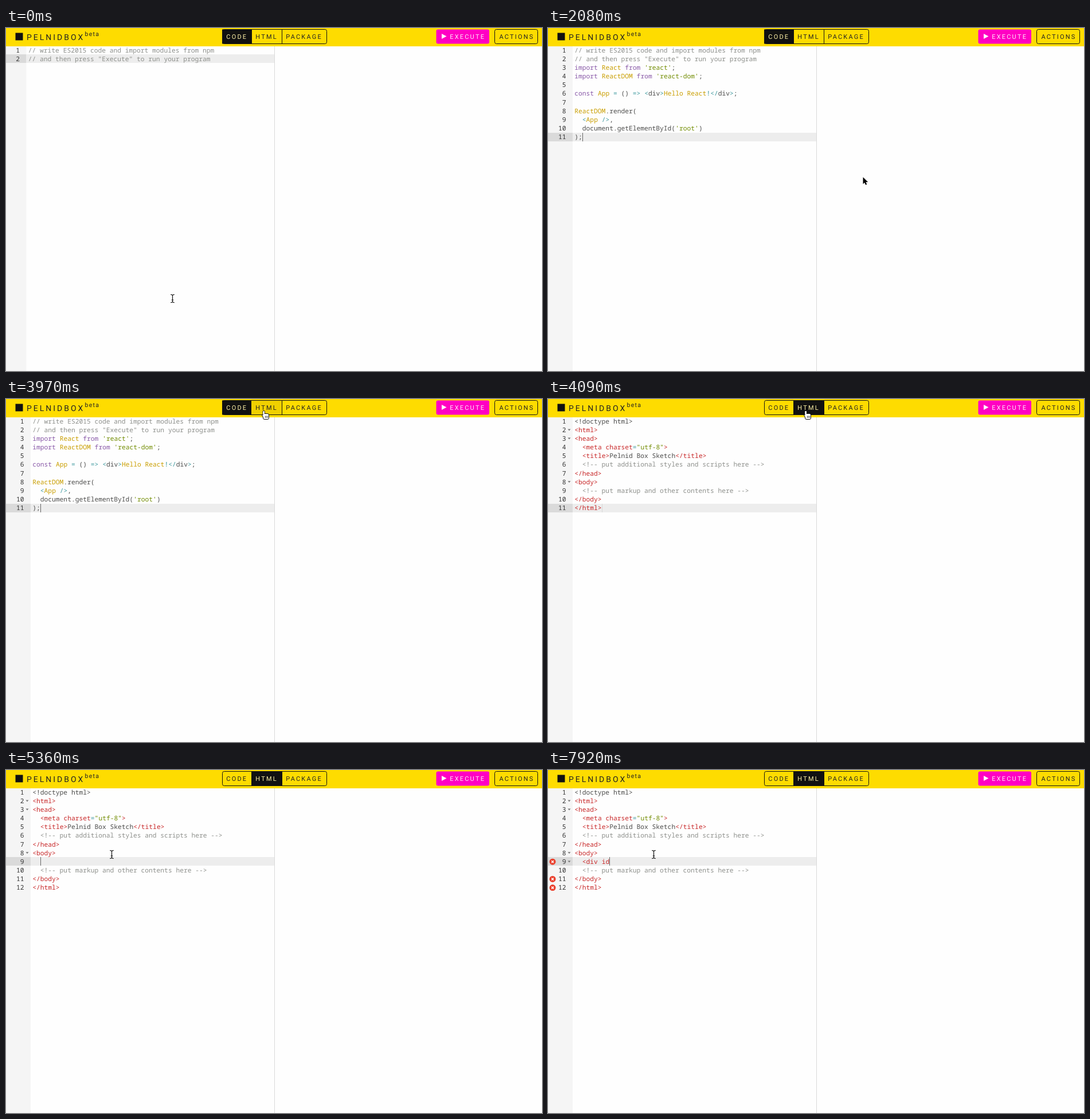
These frames come from a looping animation (935x599 px, 8 s). An HTML page with a canvas:

```html
<!DOCTYPE html>
<html lang="en">
<head>
<meta charset="utf-8">
<title>Code editor</title>
<style>
  html, body { margin: 0; width: 100%; height: 100%; overflow: hidden; background: #fefefe; }
  canvas { display: block; }
</style>
</head>
<body>
<canvas id="stage" width="935" height="599"></canvas>
<script>
const ctx = document.getElementById('stage').getContext('2d');
const LOOP = 8000, CHAR = 6.77, ROW = 15.14, TOP = 31.2;
const MONO = `${CHAR / 0.6}px "Noto Sans Mono", monospace`;
const LABEL = '11px Roboto, sans-serif';
const YELLOW = '#fedc00', INK = '#111';

const COLORS = {
  t: '#4d4d4c', c: '#8e908c', k: '#8959a8', y: '#c99e00',
  s: '#718c00', o: '#3e999f', r: '#c82829'
};

// Each token starts with its color key; tokens are split by "|".
const CODE = [
  'c// write ES2015 code and import modules from npm',
  'c// and then press "Execute" to run your program',
  "kimport |yReact |kfrom |s'react'|t;",
  "kimport |yReactDOM |kfrom |s'react-dom'|t;",
  '',
  'kconst |yApp |o= |t() |o=> <|tdiv|o>|yHello React|o!</|tdiv|o>|t;',
  '',
  'yReactDOM|t.render(',
  't  |o<|yApp |o/>|t,',
  "t  document.getElementById(|s'root'|t)",
  't);'
];
const MARKUP = [
  't<!doctype html>',
  'r<html>',
  'r<head>',
  't  |r<meta charset|o=|s"utf-8"|r>',
  't  |r<title>|tPelnid Box Sketch|r</title>',
  'c  <!-- put additional styles and scripts here -->',
  'r</head>',
  'r<body>',
  'c  <!-- put markup and other contents here -->',
  'r</body>',
  'r</html>'
];

// One key per beat: "·" is a pause, "←" deletes.
const KEYS = '<··di····v· ····i··←·id', BEAT = 90;

function typedAt(t) {
  let out = '';
  for (const key of KEYS.slice(0, Math.max(0, Math.floor((t - 5920) / BEAT) + 1))) {
    if (key === '←') out = out.slice(0, -1);
    else if (key !== '·') out += key;
  }
  return out;
}

// Mouse legs: start, end, and the point reached.
const STEP = 105;
const LEGS = [
  [1555, 2080, 549, 260], [2080, 2290, 737, 69], [2450, 2970, 537, 19],
  [3070, 3580, 455, 21], [3865, 3970, 449, 20], [4245, 4700, 184, 147]
];

function mouseAt(t) {
  let x = 290, y = 472;
  for (const [start, end, x2, y2] of LEGS) {
    const left = Math.max(0, Math.ceil((end - t) / STEP)) * STEP;
    const u = Math.min(1, Math.max(0, 1 - left / (end - start)));
    const p = u * u * (3 - 2 * u);
    x += (x2 - x) * p;
    y += (y2 - y) * p;
  }
  return [x, y];
}

const rowTop = n => Math.round(TOP + ROW * (n - 1));
const rowMid = n => TOP + ROW * (n - 0.5);

function rect(color, x, y, w, h) {
  ctx.fillStyle = color;
  ctx.fillRect(x, y, w, h);
}

function text(str, x, y, color, font, spacing = 0, align = 'left') {
  ctx.font = font;
  ctx.letterSpacing = spacing + 'px';
  ctx.textAlign = align;
  ctx.fillStyle = color;
  ctx.fillText(str, x, y);
  return ctx.measureText(str).width;
}

const label = (str, x, color) => text(str, x, 19, color, LABEL, 2.2);

function paint(fill, stroke, width = 1) {
  if (stroke) {
    ctx.strokeStyle = stroke;
    ctx.lineWidth = width;
    ctx.stroke();
  }
  if (fill) {
    ctx.fillStyle = fill;
    ctx.fill();
  }
}

function roundBox(x, y, w, h, r, fill, stroke, width) {
  ctx.beginPath();
  ctx.roundRect(x, y, w, h, r);
  paint(fill, stroke, width);
}

function shape(points, fill, stroke, width) {
  ctx.beginPath();
  points.forEach(([x, y]) => ctx.lineTo(x, y));
  ctx.closePath();
  paint(fill, stroke, width);
}

function lines(color, width, ...paths) {
  ctx.beginPath();
  for (const [x, y, ...rest] of paths) {
    ctx.moveTo(x, y);
    for (let i = 0; i < rest.length; i += 2) ctx.lineTo(rest[i], rest[i + 1]);
  }
  paint(null, color, width);
}

function editorState(t) {
  const state = { folds: [], errors: [], caret: '#666' };
  if (t < 980) {
    const fresh = t < 350;
    return Object.assign(state, {
      rows: fresh ? CODE.slice(0, 2) : [...CODE.slice(0, 2), ''],
      active: fresh ? 2 : 3, col: fresh ? 47 : 0, caret: t >= 180 && '#666'
    });
  }
  if (t < 4090) {
    const lit = (t - 970) % 1000 < 600;
    return Object.assign(state, { rows: CODE, active: 11, col: 2, caret: lit && '#666' });
  }
  Object.assign(state, { rows: MARKUP, folds: [2, 3, 8] });
  if (t < 5000) return Object.assign(state, { active: 11, col: 7, caret: '#d8d8d8' });
  if (t < 5360) return Object.assign(state, { active: 8, col: 6 });

  const typed = typedAt(t);
  state.rows = [...MARKUP.slice(0, 8), 't  |r' + typed, ...MARKUP.slice(8)];
  if (typed.length > 1) state.folds.push(9);
  if (t >= 6400) state.errors = [t < 7110 ? 10 : 9, 11, 12];
  return Object.assign(state, { active: 9, col: 2 + typed.length });
}

function drawError(n) {
  ctx.save();
  ctx.translate(8, rowMid(n) + 0.3);
  roundBox(-5.5, -5.5, 11, 11, 5.5, '#ea3f2c');
  lines('#fff', 1.5, [-2, -2, 2, 2], [2, -2, -2, 2]);
  ctx.restore();
}

function drawEditor(t) {
  const { rows, active, col, caret, folds, errors } = editorState(t);
  const gutter = t < 980 ? 35.5 : 43, left = gutter + 3.3;
  const y = rowTop(active), h = rowTop(active + 1) - y;

  rect('#f5f5f5', 0, 32, gutter, 567);
  rect('#dadada', 0, y, gutter, h);
  rect('#ededed', gutter, y, 468 - gutter, h);

  rows.forEach((row, i) => {
    const base = TOP + ROW * i + 11.5;
    text(i + 1, gutter - 11.6, base, '#333', MONO, 0, 'right');
    let n = 0;
    for (const token of row.split('|')) {
      const str = token.slice(1);
      text(str, left + n * CHAR, base, COLORS[token[0]], MONO);
      n += str.length;
    }
  });

  for (const n of folds) {
    const m = rowMid(n);
    shape([[34.5, m - 1.5], [39.5, m - 1.5], [37, m + 1.5]], '#777');
  }
  errors.forEach(drawError);
  if (caret) rect(caret, Math.round(left + col * CHAR), y, 1, h);
  rect('#d9d9d9', 468, 32, 1, 567);
}

function drawTabs(t, mx, my) {
  const active = t < 4090 ? 'CODE' : 'HTML';
  let x = 377;
  for (const name of ['CODE', 'HTML', 'PACKAGE']) {
    ctx.font = LABEL;
    ctx.letterSpacing = '2.2px';
    const w = Math.round(ctx.measureText(name).width + 14);
    const on = name === active;
    const hover = my > 3 && my < 28 && mx >= x && mx < x + w;
    if (on) rect(INK, x, 2.5, w + 1, 25);
    else if (hover) rect('#f0d000', x, 3, w, 24);
    if (on && t >= 4350 && t < 5000) {
      roundBox(x, 2, w + 0.5, 26, 1, null, 'rgba(70,65,20,.5)', 2.5);
    }
    label(name, x + 7.3, on ? '#fff3a8' : '#222');
    x += w;
    if (name !== 'PACKAGE') rect(INK, x, 3, 1, 24);
  }
  roundBox(377.5, 2.5, x - 377, 25, 3, null, INK);
}

function drawHeader(t, mx, my) {
  rect(YELLOW, 0, 0, 935, 32);
  rect(INK, 16.5, 8.5, 13, 13);
  text('PELNIDBOX', 36, 20.5, '#222', '14px Roboto, sans-serif', 3);
  text('beta', 137.5, 14, '#222', '10.5px Roboto, sans-serif', 1.3);
  drawTabs(t, mx, my);

  roundBox(750.5, 2.5, 92.5, 25, 3, '#ff00c3');
  shape([[760, 10], [768.5, 14.5], [760, 19]], '#fff');
  label('EXECUTE', 774.2, '#ffe9f9');
  roundBox(852.5, 2.5, 75, 25, 3, null, INK);
  label('ACTIONS', 860.5, '#222');
}

const ARROW = [[0, 0], [0, 12], [2.7, 9.6], [4.6, 13.6], [6.8, 12.6], [4.9, 8.7], [8.6, 8.4]];

function drawHand() {
  // Outline first, then the same parts in white.
  for (const stroke of [INK, null]) {
    roundBox(-1, 0.5, 2.2, 10, 1.1, '#fff', stroke, 2);
    roundBox(-0.5, 5.5, 9, 9, 2.5, '#fff', stroke, 2);
    shape([[-2.5, 7.5], [0, 8.5], [1, 13]], '#fff', stroke, 2);
  }
  for (const x of [2.6, 4.6, 6.6]) rect(INK, x, 9, 0.8, 3.3);
}

function drawBeam() {
  lines(INK, 1.2, [0, -6, 0, 6], [-1.8, 2.5, 1.8, 2.5]);
  for (const s of [-1, 1]) {
    lines(INK, 1.2, [-3.3, 7 * s, -1, 6.6 * s, 0, 5.6 * s, 1, 6.6 * s, 3.3, 7 * s]);
  }
}

function drawMouse(x, y) {
  ctx.save();
  ctx.translate(x + 0.5, y + 0.5);
  ctx.lineJoin = 'round';
  if (y < 28 && x >= 377 && x < 559) drawHand();
  else if (y > 32 && x < 465) drawBeam();
  else shape(ARROW, '#000', '#fff', 1.8);
  ctx.restore();
}

function draw(t) {
  const [mx, my] = mouseAt(t);
  ctx.textRendering = 'geometricPrecision';
  rect('#fefefe', 0, 0, 935, 599);
  drawEditor(t);
  drawHeader(t, mx, my);
  drawMouse(mx, my);
}

const start = performance.now();
function tick() {
  draw((performance.now() - start) % LOOP);
  requestAnimationFrame(tick);
}
tick();
</script>
</body>
</html>
```
